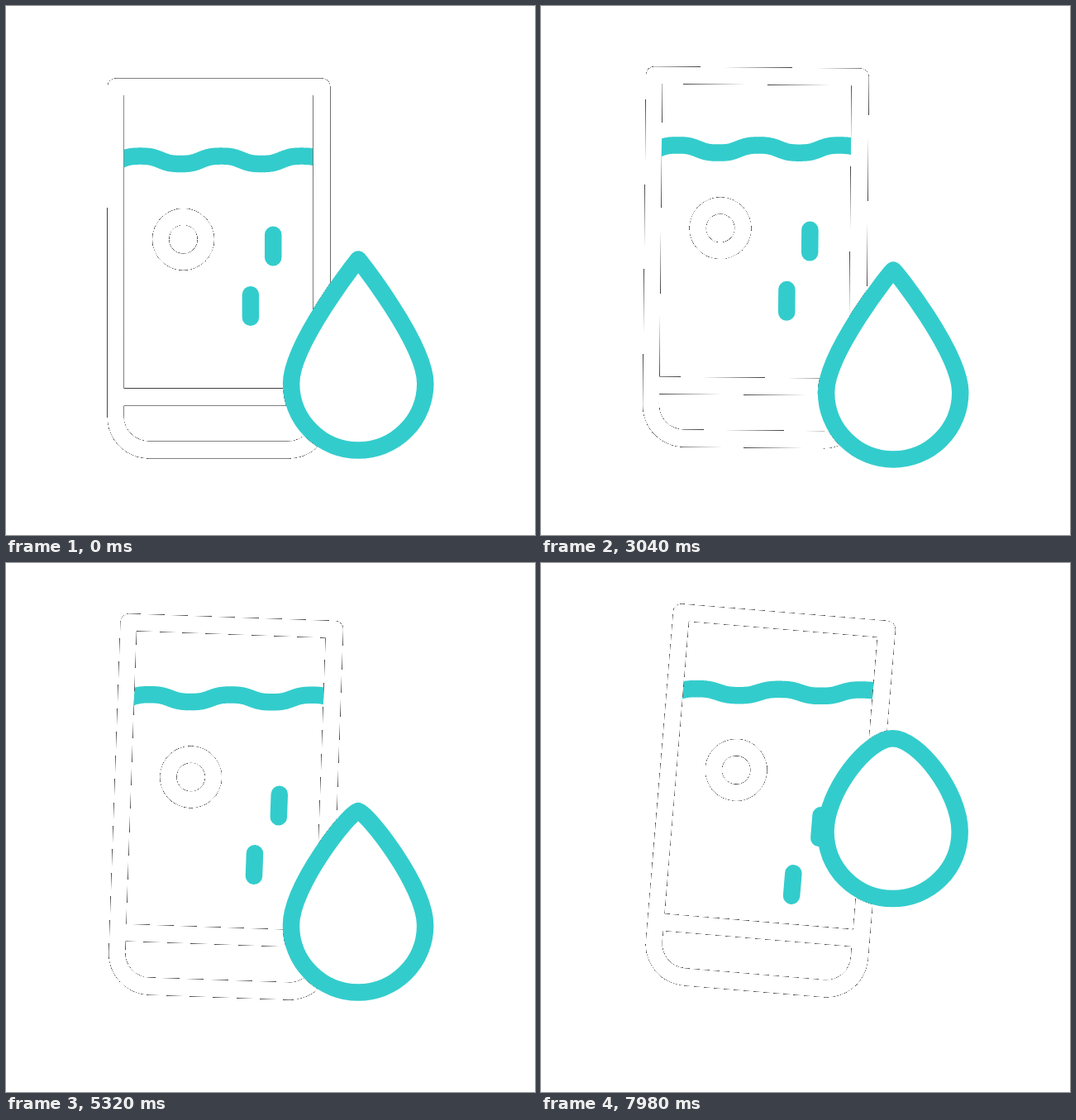
These frames come from a looping animation (640x640 px, 8000 ms). An HTML page with a canvas:

```html
<!DOCTYPE html>
<html lang="en">
<head>
<meta charset="utf-8">
<title>Phone and water drop</title>
<style>
  html, body { margin: 0; width: 100%; height: 100%; overflow: hidden; background: #fff; }
  canvas { display: block; }
</style>
</head>
<body>
<canvas id="stage" width="640" height="640"></canvas>
<script>
const SIZE = 640, LOOP = 8000, STEP = 380;
const HOLD = 2, LAST = 21;          // steps at rest, final step
const TEAL = '#33cccc';
const LINE = 20.5;
const PIVOT = { x: 257.5, y: 542 };
const MIN_ALPHA = 64;

const ctx = document.getElementById('stage').getContext('2d');
const mask = document.createElement('canvas');
mask.width = mask.height = SIZE;
const mctx = mask.getContext('2d', { willReadFrequently: true });

const smooth = t => {
  t = Math.min(1, Math.max(0, t));
  return t * t * (3 - 2 * t);
};

// The drop dips with an ease-out, then climbs with growing speed.
function dropShift(n) {
  const dip = 11.5 * (1 - Math.max(0, 1 - n / 5) ** 2);
  const r = Math.max(0, (n - 5) / 14);
  return dip - 143 * r * r * (0.8 + 0.2 * smooth((r - 0.4) / 0.45));
}

function pose(step) {
  const n = Math.max(0, step - HOLD);
  const s = n / (LAST - HOLD);
  return {
    angle: 0.0001 + 0.0828 * s ** 1.87,
    lift: -29.2 * s * (1 + (1 - s) * (0.7 - 0.28 * s)),
    sink: 51.8 * s ** 1.8,
    squash: 37.3 * s ** 2.55,
    dropX: 426.2 - 0.6 * s ** 3,
    dropY: 456.5 + dropShift(n)
  };
}

function boxPath(l, t, r, b, rTop, rBottom) {
  const p = new Path2D();
  p.roundRect(l, t, r - l, b - t, [rTop, rTop, rBottom, rBottom]);
  return p;
}

const screen = boxPath(142.5, 108.1, 371.5, 462.8, 0, 0);

const body = boxPath(122.725, 87.4, 392.4, 547.4, 10, 50);
body.addPath(screen);
body.addPath(boxPath(142.5, 483.5, 371.5, 526.4, 0, 30));
for (const r of [37.5, 17.3]) {
  const ring = new Path2D();
  ring.arc(214.5, 282.3, r, 0, Math.PI * 2);
  body.addPath(ring);
}

// The tip sinks and rounds off as the drop is squashed.
function dropPath({ dropX: x, dropY: y, squash }) {
  const r = 81.1, top = y - 150 + squash, round = squash * 0.82;
  const p = new Path2D();
  p.moveTo(x, top);
  p.bezierCurveTo(x - round, top, x - r, y - 48, x - r, y);
  p.arc(x, y, r, Math.PI, 0, true);
  p.bezierCurveTo(x + r, y - 48, x + round, top, x, top);
  p.closePath();
  return p;
}

function tilt(c, { angle, lift }) {
  c.translate(PIVOT.x, PIVOT.y + lift);
  c.rotate(angle);
  c.translate(-PIVOT.x, -PIVOT.y);
}

function stroke(c, path, color) {
  c.lineWidth = LINE;
  c.lineJoin = 'round';
  c.strokeStyle = color;
  c.stroke(path);
}

// The water surface stays almost level while the phone tilts.
function drawWave(p) {
  const { angle, lift } = p;
  const amp = 5.1 - 11 * angle;
  const period = 97.7 * (1 + 0.2 * angle);
  const wave = new Path2D();
  for (let x = -145; x <= 145; x++) {
    const a = (x - 2.6) / period * Math.PI * 2;
    wave.lineTo(x, -amp * (Math.cos(a) - 0.08 * Math.cos(3 * a)));
  }
  ctx.save();
  tilt(ctx, p);
  ctx.clip(screen);
  ctx.resetTransform();
  ctx.translate(PIVOT.x + angle * 345, 186.3 + lift - 20 * angle + 178 * angle * angle);
  ctx.rotate(angle * 0.08);
  stroke(ctx, wave, TEAL);
  ctx.restore();
}

function drawPills(p) {
  ctx.save();
  tilt(ctx, p);
  ctx.fillStyle = TEAL;
  for (const [x, y] of [[323.2, 290.5], [295.9, 363]]) {
    ctx.beginPath();
    ctx.roundRect(x - p.sink * 0.04 - LINE / 2, y + p.sink - 24, LINE, 48, LINE / 2);
    ctx.fill();
  }
  ctx.restore();
}

// The body is white; only its partly covered edge pixels show, as grey hairlines
// that break off where the coverage is too low.
function drawBody(p, drop) {
  mctx.clearRect(0, 0, SIZE, SIZE);
  mctx.save();
  tilt(mctx, p);
  mctx.fillStyle = '#fff';
  mctx.fill(body, 'evenodd');
  mctx.restore();
  mctx.save();
  mctx.globalCompositeOperation = 'destination-out';
  mctx.fill(drop);
  stroke(mctx, drop, '#000');
  mctx.restore();

  const img = mctx.getImageData(0, 0, SIZE, SIZE), d = img.data;
  for (let i = 0; i < d.length; i += 4) {
    const a = d[i + 3];
    d[i] = d[i + 1] = d[i + 2] = a;
    d[i + 3] = a >= MIN_ALPHA && a < 255 ? 255 : 0;
  }
  mctx.putImageData(img, 0, 0);
  ctx.drawImage(mask, 0, 0);
}

function draw(step) {
  const p = pose(step), drop = dropPath(p);
  ctx.fillStyle = '#fff';
  ctx.fillRect(0, 0, SIZE, SIZE);
  drawWave(p);
  drawPills(p);
  drawBody(p, drop);
  ctx.fillStyle = '#fff';
  ctx.fill(drop);
  stroke(ctx, drop, TEAL);
}

let shown = -1;
function tick() {
  const step = Math.floor((performance.now() % LOOP) / STEP);
  if (step !== shown) draw(shown = step);
  requestAnimationFrame(tick);
}
tick();
</script>
</body>
</html>
```
